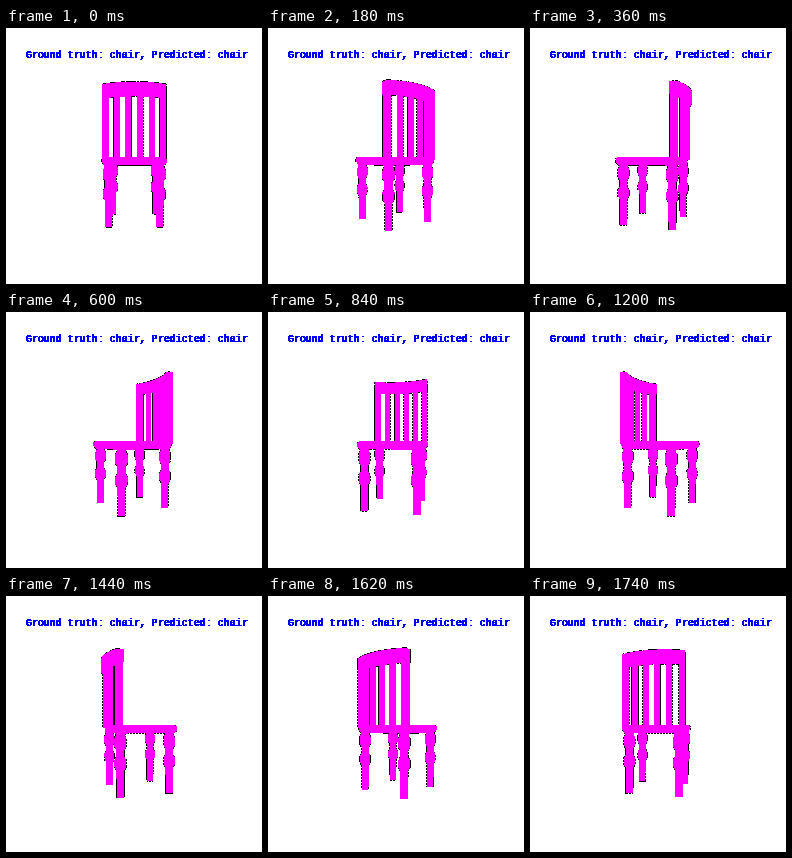
Write a matplotlib script that moves like this. It is 256 px wide and 256 px high and loops after 1800 ms.

```python
import numpy as np
import matplotlib as mpl
import matplotlib.pyplot as plt
from matplotlib.animation import FuncAnimation
from matplotlib.collections import PolyCollection

SIZE, FRAMES, INTERVAL = 256, 30, 60
MID, VIEW = 128, 230          # image centre and camera distance, in pixels
MAGENTA = "#ff00ff"
HALF, BACK_Z, BOW, DEPTH = 28.2, 19.3, 7, 5.8

mpl.rcParams["text.antialiased"] = False
mpl.rcParams["text.hinting"] = "force_autohint"
mpl.rcParams["text.hinting_factor"] = 1


def box(x, y, z):
    return np.array([(a, b, c) for a in x for b in y for c in z], float)


def bow(x):
    """Depth of the inner face of the curved back at x."""
    return BACK_Z + BOW * (1 - (x / HALF) ** 2)


def rail():
    xs = np.linspace(-HALF, HALF, 13)
    for a, b in zip(xs, xs[1:]):
        yield np.array([(x, y, bow(x) + d) for x in (a, b)
                        for y in (53.3, 63.6) for d in (0, DEPTH)])


def seat():
    plan = [(27, -32.5), (28.8, -30.5), (28.8, 22.5), (28, 23.5)]
    plan += [(-x, z) for x, z in plan]
    layers = [(-1.8, 0.96), (-3, 1), (-5.5, 1), (-7.8, 0.95)]
    return np.array([(x * s, y, z * s) for y, s in layers for x, z in plan])


def hull(pts):
    pts = sorted(map(tuple, pts))

    def chain(seq):
        out = []
        for p in seq:
            while len(out) > 1:
                (ax, ay), (bx, by) = out[-2:]
                if (bx - ax) * (p[1] - ay) > (by - ay) * (p[0] - ax):
                    break
                out.pop()
            out.append(p)
        return out[:-1]

    return chain(pts) + chain(pts[::-1])


def project(pts, angle):
    x, y, z = np.asarray(pts, float).T
    c, s = np.cos(angle), np.sin(angle)
    k = 1 / (1 - (z * c - x * s) / VIEW)
    return np.column_stack([MID + 0.3 + k * (x * c + z * s), MID - k * y])


# Turned leg profile: depth below eye level, radius
LEG = np.array([(7, 4.2), (10, 3.4), (13, 4.8), (19.5, 4.8), (22.5, 3.1),
                (29, 3.1), (32, 4.8), (37.5, 4.7), (40.5, 3), (64.4, 2.8)])
FEET = [(sx * w, z) for w, z in ((23.2, 20.4), (24, -26.5)) for sx in (-1, 1)]

SOLIDS = [seat(), *rail()]
SOLIDS += [box((s * 23.9, s * HALF), (-3, 60), (BACK_Z + 0.5, BACK_Z + DEPTH))
           for s in (-1, 1)]
SOLIDS += [box((x - 2.1, x + 2.1), (-3, 55), (bow(x) + 2, bow(x) + 4))
           for x in (-15.6, -5.2, 5.2, 15.6)]


def leg_outline(x, z, angle):
    pts = project([(x, -d, z) for d, _ in LEG], angle)
    scale = (pts[:, 1] - MID) / LEG[:, 0]
    side = np.column_stack([LEG[:, 1] * scale, np.zeros(len(LEG))])
    return np.vstack([pts - side, (pts + side)[::-1]])


fig = plt.figure(figsize=(SIZE / 72, SIZE / 72), dpi=72, facecolor="white")
ax = fig.add_axes([0, 0, 1, 1])
ax.set(xlim=(0, SIZE), ylim=(SIZE, 0))
ax.axis("off")
for x in (19, 20):            # struck twice for heavy strokes
    ax.text(x, 29.5, "Ground truth: chair, Predicted: chair", color="blue",
            family="Liberation Mono", weight="bold", size=10)

edges = PolyCollection([], facecolor="none", edgecolor="black", linewidth=1,
                       linestyle=(0, (1, 1.4)), antialiased=False,
                       snap=False, zorder=1)
faces = PolyCollection([], facecolor=MAGENTA, edgecolor="none",
                       antialiased=False, snap=False, zorder=2)
ax.add_collection(edges, autolim=False)
ax.add_collection(faces, autolim=False)


def draw(i):
    angle = 2 * np.pi * i / FRAMES
    shapes = [hull(project(p, angle)) for p in SOLIDS]
    shapes += [leg_outline(x, z, angle) for x, z in FEET]
    edges.set_verts(shapes)
    faces.set_verts(shapes)
    return edges, faces


anim = FuncAnimation(fig, draw, frames=FRAMES, interval=INTERVAL,
                     repeat=True, repeat_delay=0)
plt.show()
```
